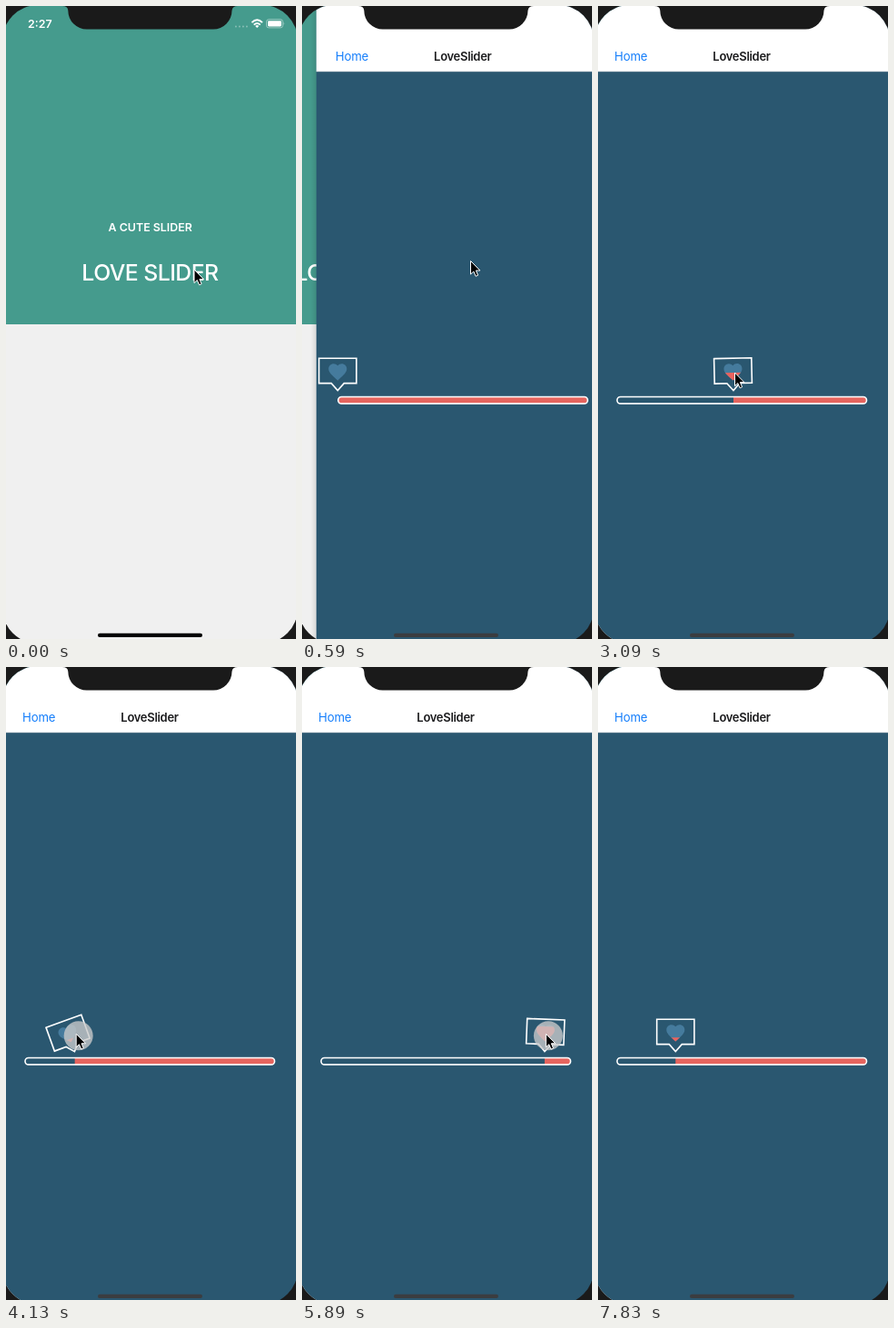
Recreate the animation shown at these times as an HTML page. Size 319x694 px, loop 8110 ms.

```html
<!DOCTYPE html>
<html lang="en">
<head>
<meta charset="utf-8">
<title>Love slider</title>
<style>
  html, body { margin: 0; width: 100%; height: 100%; overflow: hidden; background: #1a1a1a; }
  svg { display: block; width: 100vw; height: 100vh; }
  text { font-family: Inter, Roboto, sans-serif; }
</style>
</head>
<body>
<svg viewBox="0 0 319 694" preserveAspectRatio="none">
  <defs>
    <clipPath id="screen"><rect x="-4" y="-1" width="325" height="700" rx="39"/></clipPath>
    <clipPath id="heartLevel"><rect id="level" x="-12" width="24" height="20"/></clipPath>
    <clipPath id="trackShape"><rect x="21" y="428.5" width="274.5" height="7.4" rx="3.7"/></clipPath>
    <linearGradient id="shade">
      <stop offset="0" stop-opacity="0"/>
      <stop offset="1" stop-opacity=".1"/>
    </linearGradient>
    <path id="heart" d="M0-11.6L-1.45-13C-6.6-17.6-10-20.7-10-24.5C-10-27.6-7.6-30-4.5-30C-2.8-30-1.1-29.2 0-27.9C1.1-29.2 2.8-30 4.5-30C7.6-30 10-27.6 10-24.5C10-20.7 6.6-17.6 1.45-13Z"/>
  </defs>

  <rect width="319" height="694" fill="#1a1a1a"/>
  <g clip-path="url(#screen)">
    <g id="home">
      <rect x="-4" width="325" height="349" fill="#459b8d"/>
      <rect x="-4" y="349" width="325" height="350" fill="#f0f0f0"/>
      <g fill="#fff" text-anchor="middle">
        <text x="158.7" y="246.6" font-size="12.4" font-weight="600">A CUTE SLIDER</text>
        <text x="158.5" y="301" font-size="24.8" font-weight="450" letter-spacing="-.55">LOVE SLIDER</text>
      </g>
    </g>

    <g id="page">
      <rect x="-9" width="6" height="699" fill="url(#shade)"/>
      <rect x="-3" width="325" height="699" fill="#2a5770"/>
      <rect x="-3" y="-1" width="325" height="73" fill="#fff"/>
      <rect x="-3" y="71.6" width="325" height=".6" fill="#a9b5bc"/>
      <text x="18" y="59.5" font-size="13.2" letter-spacing="-.15" fill="#157efb">Home</text>
      <text x="158" y="59.6" font-size="13" letter-spacing="-.3" font-weight="600" fill="#1c1c1e" text-anchor="middle">LoveSlider</text>

      <rect id="fill" y="428" height="8.5" fill="#e5655f" clip-path="url(#trackShape)"/>
      <rect x="21" y="428.5" width="274.5" height="7.4" rx="3.7" fill="none" stroke="#fff" stroke-width="1.6"/>
      <g id="thumb">
        <path d="M-20.6-36H20.6V-8.6H7L0-.6L-7-8.6H-20.6Z" fill="none" stroke="#fff" stroke-width="1.6"/>
        <use href="#heart" fill="#457b9d"/>
        <use href="#heart" fill="#ea625e" clip-path="url(#heartLevel)"/>
      </g>
    </g>

    <g fill="#fff">
      <text x="24" y="23.8" font-size="12.4" font-weight="600">2:27</text>
      <path d="M252.9 22.5H266" stroke="#fff" stroke-opacity=".35" stroke-width="2" stroke-linecap="round" stroke-dasharray="0 4"/>
      <g fill="none" stroke="#fff" stroke-width="1.9">
        <path d="M270.4 18.2Q276.2 12.4 282 18.2"/>
        <path d="M272.7 20.6Q276.2 17.2 279.7 20.6"/>
      </g>
      <path d="M274.2 21.9Q276.2 20.3 278.2 21.9L276.2 24Z"/>
      <rect x="286.5" y="14.7" width="18" height="9.2" rx="2.6" fill="none" stroke="#fff" stroke-opacity=".5" stroke-width=".9"/>
      <rect x="288" y="16.2" width="15" height="6.2" rx="1.3"/>
      <path d="M305.6 17.6Q307 19.3 305.6 21Z" opacity=".5"/>
    </g>
    <rect id="indicator" x="101" y="687.8" width="115" height="4.2" rx="2.1"/>
  </g>
  <path d="M62-1V0Q68 0 68.3 5A20.5 20.5 0 0 0 89 25.5H228A20.5 20.5 0 0 0 248.5 5Q249 0 255 0V-1Z" fill="#1a1a1a"/>

  <circle id="touch" r="16" fill="#cbcbcb" fill-opacity=".78"/>
  <path id="cursor" d="M0 0V14.6L3.3 11.5L5.6 16.8L8.1 15.7L5.9 10.5H10.4Z" stroke="#fff" stroke-width="1" stroke-linejoin="round"/>
</svg>
<script>
const LOOP = 8110, STEP = 147.5, LAST_STEP = 53;
const PUSH_START = 282, PAGE_WIDTH = 322;
const TRACK_START = 20.5, TRACK_END = 295.5;
const DRAG_START = 2150, DRAG_END = 6500;

// Turning points of the drag: time, x
const SWINGS = [
  [DRAG_START, TRACK_START], [2850, 149], [3240, 149], [3540, 183], [3980, 60],
  [4900, 280.5], [5300, 226], [5850, 270], [DRAG_END, 85.3]
];
// Free cursor moves: time, x, y
const APPROACH = [[295, 207, 289], [590, 185.5, 279.5], [1180, 157, 360], [1760, 31, 400]];
const LEAVE = [[DRAG_END, 87, 404], [6640, 73, 406], [7000, 73, 406], [7720, 230, 700]];

const parts = {};
for (const node of document.querySelectorAll("[id]")) parts[node.id] = node;
const set = (id, attrs) => {
  for (const name in attrs) parts[id].setAttribute(name, attrs[name]);
};
const move = (id, x, y, angle = 0) =>
  set(id, { transform: `translate(${x} ${y}) rotate(${angle})` });

function along(stops, t, column = 1) {
  const next = stops.findIndex(stop => stop[0] > t);
  if (next === 0) return stops[0][column];
  if (next < 0) return stops[stops.length - 1][column];
  const a = stops[next - 1], b = stops[next];
  const k = (t - a[0]) / (b[0] - a[0]);
  return a[column] + (b[column] - a[column]) * k * k * (3 - 2 * k);
}

const thumbAt = t => along(SWINGS, t);
const speedAt = t => (thumbAt(t + 2) - thumbAt(t - 2)) / 4;

// The bubble leans against its motion and springs back.
function tiltAt(t) {
  const dt = 5, stiffness = 0.0004, damping = 0.012;
  let tilt = 0, spin = 0;
  for (let s = DRAG_START; s < t; s += dt) {
    const lean = -30 * Math.tanh(speedAt(s) / 0.3);
    spin += dt * (stiffness * (lean - tilt) - damping * spin);
    tilt += dt * spin;
  }
  return tilt;
}

function handAt(t) {
  const free = t < DRAG_START ? APPROACH : t > DRAG_END ? LEAVE : null;
  if (free) return [along(free, t), along(free, t, 2)];
  return [thumbAt(t) + 1.5, 402 + 34 * Math.exp(-(((t - 5015) / 400) ** 2))];
}

function draw(t) {
  const w = 0.0148 * Math.max(0, t - PUSH_START);
  const remaining = t < 1180 ? (1 + w) * Math.exp(-w) : 0;
  move("page", PAGE_WIDTH * remaining, 0);
  move("home", -0.3 * PAGE_WIDTH * (1 - remaining), 0);
  set("page", { visibility: remaining < 1 ? "visible" : "hidden" });
  set("indicator", { fill: remaining > 0.5 ? "#000" : "#3b3d40" });

  const x = thumbAt(t);
  const value = (x - TRACK_START) / (TRACK_END - TRACK_START);
  move("thumb", x, 422.2, tiltAt(t));
  set("fill", { x, width: 297 - x });
  set("level", { y: -11.6 - 18.4 * value });

  const [handX, handY] = handAt(t);
  const pressed = t === STEP || speedAt(t) !== 0;
  move("cursor", handX, handY);
  move("touch", handX + 2.5, handY + 2);
  set("touch", { visibility: pressed ? "visible" : "hidden" });
}

let origin, shown;
function tick(now) {
  origin ??= now;
  const step = Math.min(LAST_STEP, Math.floor(((now - origin) % LOOP + 10) / STEP));
  if (step !== shown) draw(step * STEP);
  shown = step;
  requestAnimationFrame(tick);
}
draw(0);
requestAnimationFrame(tick);
</script>
</body>
</html>
```
